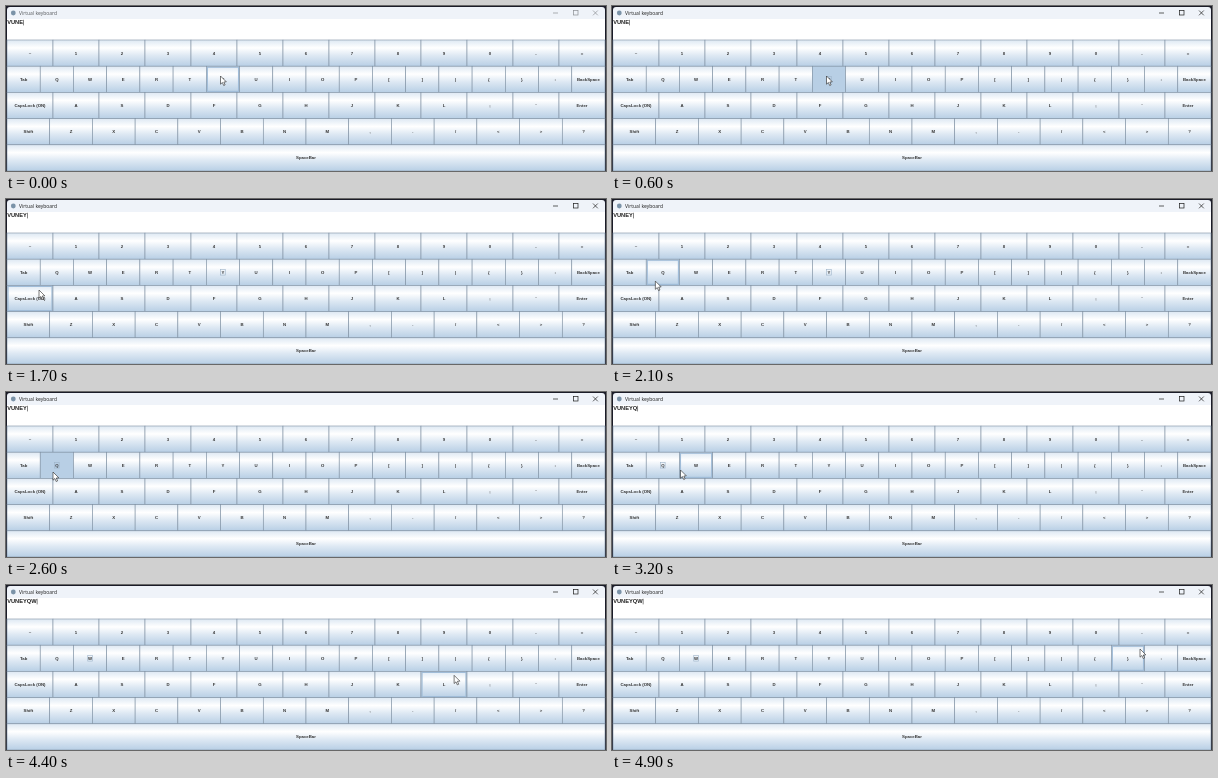
These frames come from a looping animation (600 by 165 pixels, 5 s). An HTML page with a canvas:

```html
<!DOCTYPE html>
<html lang="en">
<head>
<meta charset="utf-8">
<title>Virtual keyboard</title>
<style>
  html, body { margin: 0; width: 100%; height: 100%; overflow: hidden; background: #1b1c28; }
  canvas { display: block; }
</style>
</head>
<body>
<canvas id="stage" width="600" height="165"></canvas>
<script>
const ctx = document.getElementById('stage').getContext('2d');
const LOOP = 5000, STEP = 100;
const TOP = 34, LEFT = 1, WIDTH = 598, ROW = 26.2;
const SANS = '"Liberation Sans", Arial, sans-serif';

const rows = [
  '~ 1 2 3 4 5 6 7 8 9 0 - =',
  'Tab Q W E R T Y U I O P [ ] | { } : BackSpace',
  'CapsLock_(ON) A S D F G H J K L ; \' Enter',
  'Shift Z X C V B N M , . / < > ?',
  'SpaceBar'
].map(row => row.split(' ').map(label => label.replace('_', ' ')));

const keys = rows.flatMap((row, r) => row.map((label, i) => {
  const w = WIDTH / row.length;
  return { label, x: LEFT + i * w, y: TOP + r * ROW, w, h: ROW };
}));

// Pointer tip: time, x, y, optional easing into the point
const smooth = p => p * p * (3 - 2 * p);
const easeOut = p => 1 - (1 - p) ** 2;
const path = [
  [0, 214.5, 70], [1100, 214.5, 70], [1200, 151.5, 85], [1700, 33, 91, easeOut],
  [2300, 47, 79, smooth], [2400, 47, 80], [2900, 47, 80], [3000, 47.5, 79],
  [3100, 47.5, 79], [3200, 68.5, 78], [3500, 77, 77, easeOut], [4000, 77, 77],
  [4600, 578, 95, smooth], [4800, 372, 97], [4900, 528, 64], [LOOP, 528, 64]
];
const presses = [
  { label: 'Y', down: 600, focus: 600, up: 800 },
  { label: 'Q', down: 2400, focus: 2600, up: 2800 },
  { label: 'W', down: 3500, focus: 3500, up: 3900 }
];

function pointerAt(t) {
  const i = path.findIndex(p => p[0] > t);
  const [t0, x0, y0] = path[i - 1], [t1, x1, y1, ease = p => p] = path[i];
  const p = ease((t - t0) / (t1 - t0));
  return { x: x0 + (x1 - x0) * p, y: y0 + (y1 - y0) * p };
}

function rect(color, x, y, w, h) {
  ctx.fillStyle = color;
  ctx.fillRect(x, y, w, h);
}

function outline(color, width, x, y, w, h) {
  ctx.strokeStyle = color;
  ctx.lineWidth = width;
  ctx.strokeRect(x, y, w, h);
}

function text(str, x, y, font, color, align = 'left') {
  ctx.font = font;
  ctx.fillStyle = color;
  ctx.textAlign = align;
  ctx.fillText(str, x, y);
}

function line(...points) {
  ctx.beginPath();
  points.forEach(([x, y]) => ctx.lineTo(x, y));
  ctx.stroke();
}

function drawWindow(active) {
  rect('#1b1c28', 0, 0, 600, 165);
  ctx.beginPath();
  ctx.roundRect(1, 1, WIDTH, 170, 3);
  ctx.fillStyle = '#eff3f9';
  ctx.fill();
  rect('#fff', LEFT, 13, WIDTH, 21);

  ctx.beginPath();
  ctx.arc(7.3, 7, 2.4, 0, 7);
  ctx.fillStyle = '#7b93a8';
  ctx.fill();
  const ink = active ? '#1c1c1c' : '#8b8e93';
  text('Virtual keyboard', 13, 9, '5px "Open Sans", sans-serif', active ? '#1c1c1c' : '#55585c');
  outline(ink, 0.7, 567.5, 4.5, 4.5, 4.5);
  line([547, 7], [552, 7]);
  line([587, 4.5], [591.8, 9.3]);
  line([591.8, 4.5], [587, 9.3]);
}

function drawKey({ label, x, y, w, h }, hovered, pressed, focused) {
  const fill = ctx.createLinearGradient(0, y, 0, y + h);
  [[0, '#dde8f3'], [0.3, '#fff'], [0.6, '#dde8f3'], [1, '#b8cfe5']]
    .forEach(([at, color]) => fill.addColorStop(at, color));
  rect(pressed ? '#b8cfe5' : fill, x, y, w, h);
  if (hovered && !pressed) outline('#a0bcd8', 1.2, x + 1, y + 1, w - 2, h - 2);
  outline('#7f90a2', 0.6, x, y, w, h);

  const cx = x + w / 2, cy = y + h / 2;
  text(label, cx, cy + 1.5, `bold 4.3px ${SANS}`, '#333', 'center');
  if (focused) outline('#9db3c8', 0.6, cx - 2.3, cy - 2.8, 4.6, 5.6);
}

function drawPointer({ x, y }) {
  ctx.beginPath();
  [[0, 0], [0, 8.2], [1.9, 6.5], [3.2, 9.5], [4.6, 8.9], [3.3, 6], [5.8, 5.8]]
    .forEach(([dx, dy]) => ctx.lineTo(x + dx, y + dy));
  ctx.closePath();
  ctx.fillStyle = '#fff';
  ctx.fill();
  ctx.strokeStyle = '#222';
  ctx.lineWidth = 0.6;
  ctx.stroke();
}

function draw(t) {
  const pointer = pointerAt(t);
  const focus = presses.filter(p => t >= p.focus).pop();
  const held = presses.find(p => t >= p.down && t < p.up);
  const typed = 'VUNE' + presses.filter(p => t >= p.up).map(p => p.label).join('');

  drawWindow(t >= 600);
  text(typed, 1.2, 18.4, `bold 5.7px ${SANS}`, '#222');
  rect('#333', 1.4 + ctx.measureText(typed).width, 13.8, 0.6, 5.6);

  for (const key of keys) {
    const hovered = pointer.x >= key.x && pointer.x < key.x + key.w &&
                    pointer.y >= key.y && pointer.y < key.y + key.h;
    drawKey(key, hovered, held?.label === key.label, focus?.label === key.label);
  }
  drawPointer(pointer);
}

const start = performance.now();
function tick() {
  const t = (performance.now() - start) % LOOP;
  draw(Math.floor(t / STEP) * STEP);
  requestAnimationFrame(tick);
}
tick();
</script>
</body>
</html>
```
